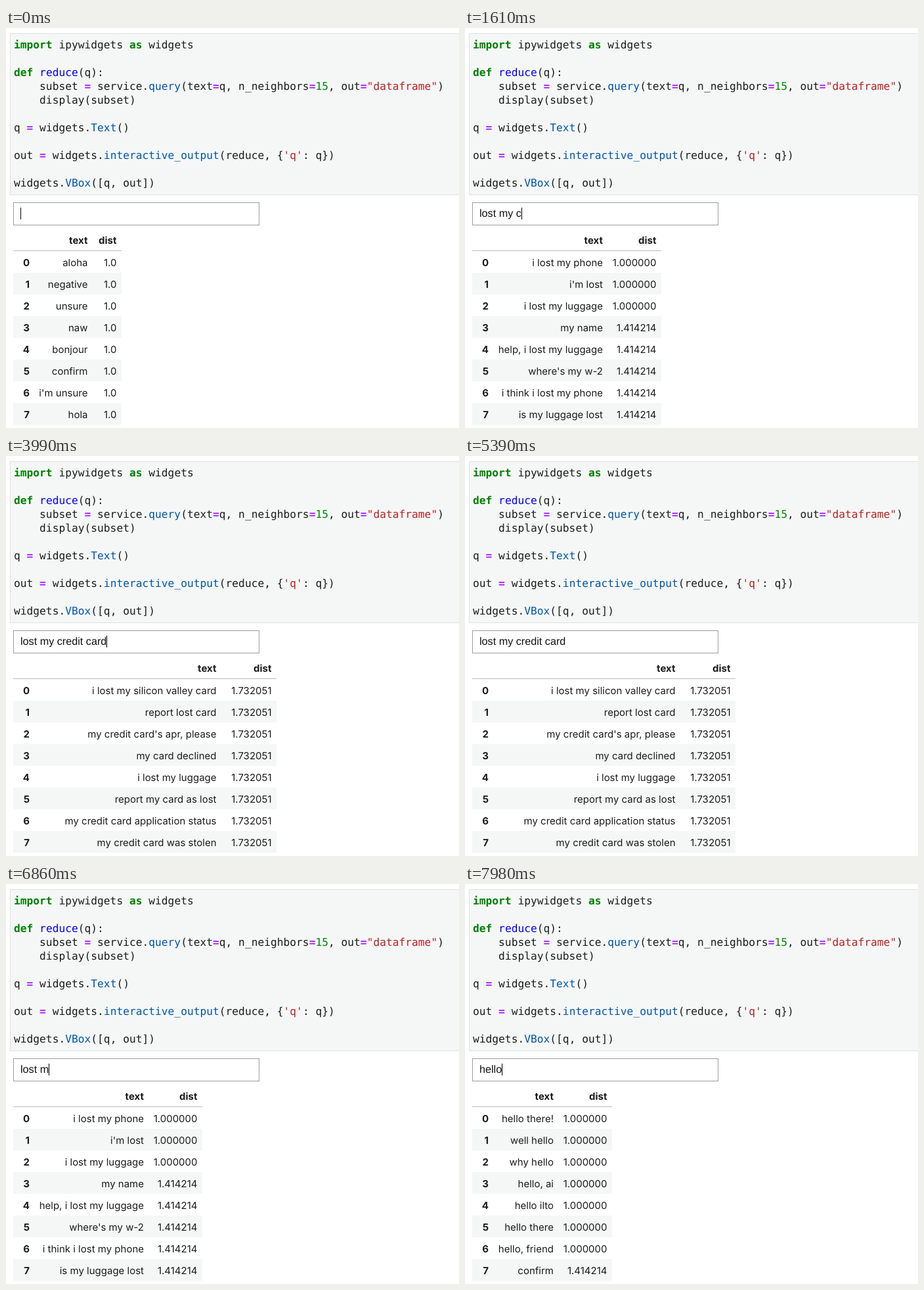
An HTML page for the animation above (8 s loop, 690 by 608 pixels).

```html
<!DOCTYPE html>
<html lang="en">
<head>
<meta charset="utf-8">
<title>Live query widget</title>
<style>
html, body { margin: 0; width: 100%; height: 100%; overflow: hidden; background: #fff; }
body { position: relative; color: #1c1c1c; text-rendering: geometricPrecision; }
body > *, .row > * { position: absolute; box-sizing: border-box; }
#code {
  left: 6px; top: 8px; width: 700px; height: 246px; margin: 0; padding: 6px 5px;
  border: 1px solid #e0e0e0; background: #f5f7f7;
  font: 16.24px/21px "DejaVu Sans Mono", monospace; white-space: pre;
}
#code b { color: #008000; }
#code b.op { color: #aa22ff; }
#code .def { color: #0000ff; }
#code .prop { color: #0055aa; }
#code .num { color: #008800; }
#code .str { color: #ba2121; }
#field {
  left: 11px; top: 265px; width: 375px; height: 35px; padding-left: 10px;
  border: 1px solid #9e9e9e; background: #fff; color: #111;
  font: 16.2px/33px "Liberation Sans", Arial, sans-serif; white-space: pre;
}
#caret {
  display: inline-block; width: 1px; height: 18px; margin-right: -1px;
  vertical-align: -4px; background: #000;
}
.row { left: 11px; height: 33px; font: 15px/35px Inter, sans-serif; white-space: pre; }
.row.odd { background: #f5f6f6; }
.row.head { top: 305px; height: 34px; border-bottom: 1px solid #bdbdbd; }
.row.head, .index { font-weight: 700; }
.index { left: 0; width: 25px; text-align: right; }
.text { left: 0; text-align: right; }
.dist { right: 7.5px; }
</style>
</head>
<body>
<pre id="code"><b>import</b> ipywidgets <b>as</b> widgets

<b>def</b> <span class="def">reduce</span>(q):
    subset <b class="op">=</b> service.<span class="prop">query</span>(text<b class="op">=</b>q, n_neighbors<b class="op">=</b><span class="num">15</span>, out<b class="op">=</b><span class="str">"dataframe"</span>)
    display(subset)

q <b class="op">=</b> widgets.<span class="prop">Text</span>()

out <b class="op">=</b> widgets.<span class="prop">interactive_output</span>(reduce, {<span class="str">'q'</span>: q})

widgets.<span class="prop">VBox</span>([q, out])</pre>
<div id="field"><span id="typed"></span><span id="caret"></span></div>
<script>
const LOOP = 8000, STEP = 70, LAG = 100, BLINK = 500;
const LEFT = 11, TOP = 339, ROW = 33;
const PHRASE = "lost my credit card", GREETING = "hello";

// Each edit: [time, resulting text]
const edits = [[0, ""]];
function typeOut(phrase, start, gap) {
  for (let n = 1; n <= phrase.length; n++) edits.push([start + (n - 1) * gap, phrase.slice(0, n)]);
}
typeOut(PHRASE, 620, 115);
edits.push([5900, PHRASE.slice(0, -1)]);
for (let n = PHRASE.length - 2, t = 6475; n >= 0; n--, t += 35) edits.push([t, PHRASE.slice(0, n)]);
typeOut(GREETING, 7330, 130);

const idleRows = "aloha|negative|unsure|naw|bonjour|confirm|i'm unsure|hola";
const creditRows = "i lost my luggage|i lost my phone|i'm lost|is my luggage lost|get my credit score|where's my w-2|how's my credit score|what's my credit rating";

// near: distance of the first `split` rows; far: distance of the rest
const table = (match, textEdge, edge, near, split, far, rows, digits = 6) =>
  ({ match, textEdge, edge, near, split, far, rows: rows.split("|"), digits });

const tables = [
  table(/hello/, 135, 224, 1, 7, Math.SQRT2,
    "hello there!|well hello|why hello|hello, ai|hello ilto|hello there|hello, friend|confirm"),
  table(/card/, 320.5, 412, Math.sqrt(3), 8, 2,
    "i lost my silicon valley card|report lost card|my credit card's apr, please|my card declined|i lost my luggage|report my card as lost|my credit card application status|my credit card was stolen"),
  table(/car/, 213, 305, Math.sqrt(3), 3, 2, creditRows),
  table(/credit/, 213, 298, Math.SQRT2, 3, Math.sqrt(3), creditRows),
  table(/my/, 210, 299, 1, 3, Math.SQRT2,
    "i lost my phone|i'm lost|i lost my luggage|my name|help, i lost my luggage|where's my w-2|i think i lost my phone|is my luggage lost"),
  table(/lost/, 124.5, 216, 0, 1, Math.SQRT2,
    "i'm lost|aloha|negative|unsure|naw|bonjour|confirm|i'm unsure"),
  table(/^/, 124.5, 176, 1, 8, 1, idleRows, 1)
];

function makeRow(className) {
  const row = document.createElement("div");
  row.className = "row " + className;
  const cells = ["index", "text", "dist"].map(name => {
    const cell = row.appendChild(document.createElement("span"));
    cell.className = name;
    return cell;
  });
  document.body.append(row);
  return { row, cells };
}

const head = makeRow("head");
const body = Array.from({ length: 8 }, (_, i) => {
  const line = makeRow(i % 2 ? "odd" : "");
  line.row.style.top = TOP + i * ROW + "px";
  return line;
});

function fill({ row, cells }, values, { textEdge, edge }) {
  row.style.width = edge - LEFT + "px";
  cells[1].style.width = textEdge - LEFT + "px";
  cells.forEach((cell, i) => { cell.textContent = values[i]; });
}

let shown;
function showTable(data) {
  if (data === shown) return;
  shown = data;
  fill(head, ["", "text", "dist"], data);
  body.forEach((line, i) => {
    const dist = i < data.split ? data.near : data.far;
    fill(line, [i, data.rows[i], dist.toFixed(data.digits)], data);
  });
}

const editAt = t => edits.findLast(([time]) => time <= t) || edits[0];
const typed = document.getElementById("typed");
const caret = document.getElementById("caret");

function draw(now) {
  const t = Math.floor((now % LOOP) / STEP) * STEP;
  const [since, text] = editAt(t);
  typed.textContent = text;
  caret.style.visibility = Math.floor((t - since) / BLINK) % 2 ? "hidden" : "visible";
  const query = editAt(t - LAG)[1];
  showTable(tables.find(({ match }) => match.test(query)));
}

const start = performance.now();
function tick() {
  draw(performance.now() - start);
  requestAnimationFrame(tick);
}
tick();
</script>
</body>
</html>
```
